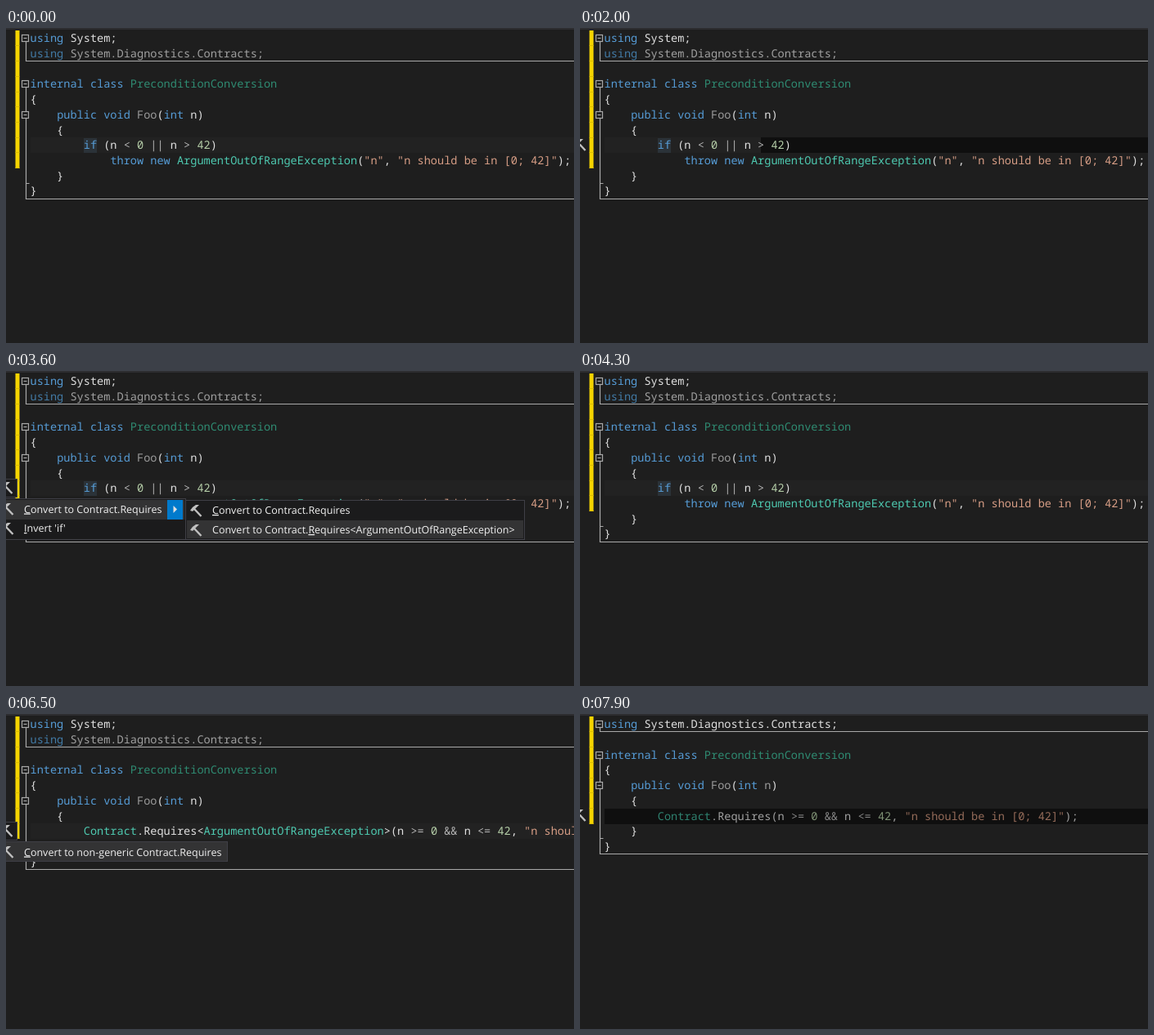
These frames come from a looping animation (694 px wide and 386 px high, 8000 ms). An HTML page:

```html
<!DOCTYPE html>
<html lang="en">
<head>
<meta charset="utf-8">
<title>Precondition conversion</title>
<style>
  html, body { margin: 0; width: 100%; height: 100%; overflow: hidden; background: #1e1e1e; }
  svg { display: block; width: 100vw; height: 100vh; }
  text { white-space: pre; text-rendering: geometricPrecision; fill: #e0e0e0; }
  .code { font: 500 13.6px "Noto Sans Mono", monospace; }
  .menu { font: 12.5px "Open Sans", sans-serif; fill: #f1f1f1; }
  .menu tspan { text-decoration: underline; }
  .kw { fill: #569cd6; }
  .type { fill: #4ec9b0; }
  .decl { fill: #2f8b72; }
  .str { fill: #d69d85; }
  .num { fill: #b5cea8; }
  .op { fill: #b4b4b4; }
  .gray { fill: #9b9b9b; }
  .unused .kw { fill: #427aa5; }
  .unused, .faded { fill: #a0a0a0; }
  .faded .type { fill: #2f8270; }
  .faded .str { fill: #946b59; }
  .faded .num { fill: #7f9275; }
  .faded .op { fill: #858585; }
  .fold { fill: none; stroke: #a9a9a9; stroke-width: 1.2; }
</style>
</head>
<body>
<svg id="stage" viewBox="0 0 694 386"></svg>
<script>
const LOOP = 8000, LEFT = 29.5, PITCH = 18.72, CHAR = 8.16;
const centre = row => Math.round(12.2 + PITCH * row);
const bottom = row => Math.round(21.4 + PITCH * row);
const column = n => LEFT + CHAR * n;

const span = (kind, text) => `<tspan class="${kind}">${text}</tspan>`;
const kw = s => span('kw', s), type = s => span('type', s), str = s => span('str', s);
const num = s => span('num', s), op = s => span('op', s), gray = s => span('gray', s);

const rect = (x, y, w, h, fill, extra = '') =>
  `<rect x="${x}" y="${y}" width="${w}" height="${h}" fill="${fill}" ${extra}/>`;
const line = (row, content, style = '') =>
  `<text class="code ${style}" x="${LEFT}" y="${centre(row) + 5}">${content}</text>`;
const label = (x, y, content) => `<text class="menu" x="${x}" y="${y}">${content}</text>`;

// Windows are [from, to] or [from, to, fadeIn], in ms.
const layer = (windows, content) =>
  `<g data-windows="${JSON.stringify(windows)}">${content}</g>`;

const hammer = (x, y) => `<g transform="translate(${x} ${y})">
  <path d="M-7 0Q-4-5 0-7L4-7L0-3L-4 1Z" fill="#c0c0c0"/>
  <path d="M-2-2L6.5 7" stroke="#c0c0c0" stroke-width="2.4"/></g>`;

const caret = (x, row) => rect(x - .5, centre(row) - 9, 1.2, 19, '#f0f0f0');
const highlight = (row, x = 30, fill = '#0f0f0f') => rect(x, centre(row) - 9, 694 - x, 19, fill);

function gutter(usingEnd, end) {
  const top = usingEnd + 2, method = top + 2;
  const y = row => bottom(row) + .5;
  const box = row => {
    const c = centre(row) + .5;
    return `<rect x="19.5" y="${c - 4}" width="8" height="8" style="fill:#1e1e1e"/><path d="M21.5 ${c}h4"/>`;
  };
  let bar = '';
  for (let row = 0; row <= end - 2; row++) {
    const from = row ? bottom(row - 1) + 1 : 3, to = bottom(row) + 1;
    bar += rect(11.5, from, 5, to - from, '#f5d400') + rect(11.5, to - 1, 5, 1, '#dcbc00');
  }
  return `${bar}<g class="fold">
    <path d="M24.5 ${centre(0)}V${y(usingEnd)}H694M24.5 ${centre(top)}V${y(end)}H694M24.5 ${y(end - 1)}h4"/>
    ${box(0)}${box(top)}${box(method)}</g>`;
}

const contracts = kw('using') + ' System.Diagnostics.Contracts;';
const signature = n => `    ${kw('public void')} ${gray('Foo')}(${kw('int')} ${n})`;
const message = str('"n should be in [0; 42]"');
const exception = type('ArgumentOutOfRangeException');
const range = `n ${op('&gt;=')} ${num('0')} ${op('&amp;&amp;')} n ${op('&lt;=')} ${num('42')}, ${message});`;
const indent = ' '.repeat(8);
const generic = owner => line(7, `${indent}${owner}.Requires&lt;${exception}&gt;(${range}`);
const simple = `${indent}${type('Contract')}.Requires(${range}`;

const classHead = row =>
  line(row, `${kw('internal class')} ${span('decl', 'PreconditionConversion')}`) + line(row + 1, '{');
const openMethod = (row, n = 'n') => line(row, signature(n)) + line(row + 1, '    {');
const closing = row => line(row, '    }') + line(row + 1, '}');
const systemUsing = line(0, kw('using') + ' System;');

const before = gutter(1, 10) + rect(95, 135, 16, 18, '#2b3238') +
  systemUsing + line(1, contracts, 'unused') + classHead(3) + openMethod(5) +
  line(7, `${indent}${kw('if')} (n ${op('&lt;')} ${num('0')} ${op('||')} n ${op('&gt;')} ${num('42')})`) +
  line(8, `${indent}    ${kw('throw new')} ${exception}(${str('"n"')}, ${message});`) + closing(9);

const converted = gutter(1, 9) + systemUsing + classHead(3) + openMethod(5) + closing(8) +
  layer([[4700, 6800]], line(1, contracts, 'unused')) +
  layer([[6800, 7300]], line(1, contracts)) +
  layer([[4700, 6500]], generic('Contract')) +
  layer([[6500, 7300]], generic(type('Contract')));

const after = gutter(0, 8) + line(0, contracts) + classHead(2) + closing(7) +
  layer([[7300, 7600]], openMethod(4) + line(6, simple)) +
  layer([[7600, LOOP]], openMethod(4, gray('n')) + line(6, simple, 'faded'));

const panel = (x, y, w, h) => rect(x + .5, y + .5, w, h, '#1b1b1c', 'stroke="#3f3f46"');
const selected = (x, y, w, h) => rect(x, y, w, h, '#333334');
const arrow = fill => `<path d="M204.500 165v9l4.500-4.500z" fill="${fill}"/>`;
const menuButton = panel(-3, 132, 16, 22) + hammer(1, 143);

const mainMenu = menuButton + panel(-3, 156, 222, 50) + selected(0, 158, 218, 24) +
  hammer(2, 169) + label(22, 173.5, '<tspan>C</tspan>onvert to Contract.Requires') +
  hammer(2, 193) + label(22, 197, "<tspan>I</tspan>nvert 'if'");

const subMenu = index => panel(219, 158, 414, 48) + selected(221, index ? 183 : 160, 411, 22) +
  hammer(232, 171) + label(252, 175, '<tspan>C</tspan>onvert to Contract.Requires') +
  hammer(232, 195) +
  label(252, 199, 'Convert to Contract.<tspan>R</tspan>equires&lt;ArgumentOutOfRangeException&gt;');

const singleMenu = menuButton + panel(-3, 156, 273, 24) + selected(0, 157, 270, 23) +
  hammer(2, 169) + label(22, 173.5, '<tspan>C</tspan>onvert to non-generic Contract.Requires');

const stage = document.getElementById('stage');
stage.innerHTML = [
  rect(0, 0, 694, 386, '#1e1e1e'),
  rect(0, 0, 694, 2, '#2d2d30'),
  layer([[0, 7300]], highlight(7, 30, '#222222')),
  layer([[900, 2000, 500], [4700, 6200], [6800, 7300]], highlight(7)),
  layer([[2000, 2100]], highlight(7, 221)),
  layer([[7300, LOOP]], highlight(6)),
  layer([[0, 4700]], before),
  layer([[4700, 7300]], converted),
  layer([[7300, LOOP]], after),
  layer([[1100, 1600]], caret(column(9), 7)),
  layer([[5600, 6000]], caret(column(10), 7)),
  layer([[1000, 2100], [5300, 6200]], hammer(0, 143)),
  layer([[7400, LOOP]], hammer(0, 124)),
  layer([[2100, 3700]], mainMenu),
  layer([[2100, 2800]], arrow('#999') + subMenu(0)),
  layer([[2800, 3700]], rect(197, 158, 19, 24, '#007acc') + arrow('#e0e0e0') + subMenu(1)),
  layer([[6200, 6800]], singleMenu)
].join('');

const layers = [...stage.querySelectorAll('[data-windows]')]
  .map(node => ({ node, windows: JSON.parse(node.dataset.windows) }));

function render(now) {
  const t = now % LOOP;
  for (const { node, windows } of layers) {
    const active = windows.find(([from, to]) => t >= from && t < to);
    node.style.display = active ? '' : 'none';
    if (active) node.style.opacity = active[2] ? Math.min(1, (t - active[0]) / active[2]) : 1;
  }
}

const start = performance.now();
function tick() {
  render(performance.now() - start);
  requestAnimationFrame(tick);
}
tick();
</script>
</body>
</html>
```
